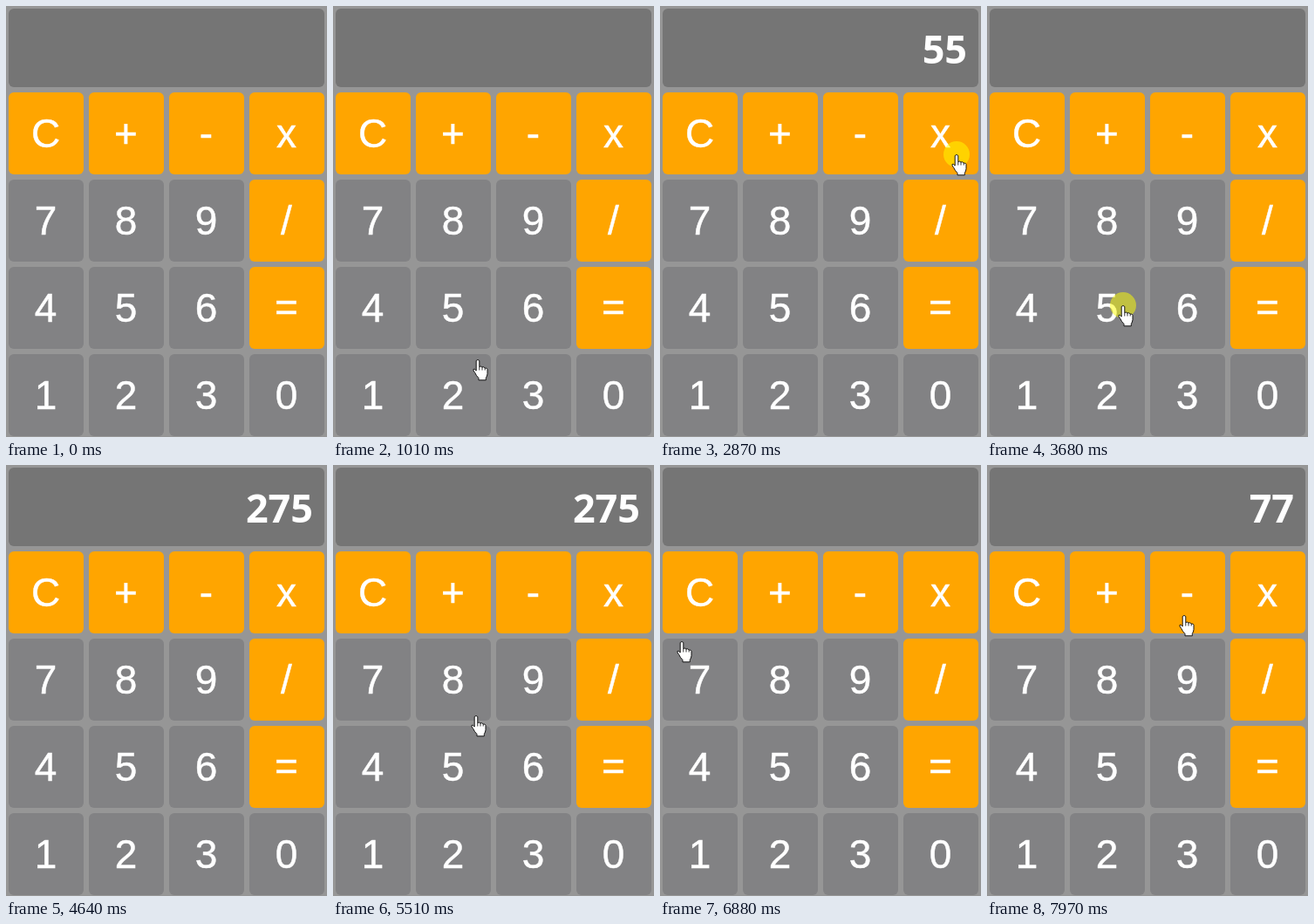
These frames come from a looping animation (368x494 px, 8000 ms). An HTML page:

```html
<!DOCTYPE html>
<html lang="en">
<head>
<meta charset="utf-8">
<title>Calculator</title>
<style>
  html, body { margin: 0; width: 100%; height: 100%; overflow: hidden; background: #969696; }
  svg { display: block; width: 368px; height: 494px; }
  text { fill: #fff; }
  .key { font: 46px "Liberation Sans", Arial, sans-serif; text-anchor: middle; stroke: #fff; stroke-width: .5px; }
  #readout { font: 700 45px "Open Sans", "Noto Sans", sans-serif; text-anchor: end; }
</style>
</head>
<body>
<svg viewBox="0 0 368 494">
  <rect width="368" height="494" fill="#969696"/>
  <rect x="3" y="3" width="362" height="90" rx="6" fill="#757575"/>
  <text id="readout" x="352" y="66"></text>
  <g id="keys"></g>
  <g id="pointer">
    <circle id="halo" r="15" fill="#ff0" opacity=".5"/>
    <path d="M-1.8 1.5Q0-.6 1.8 1.5V8.5Q4 7.4 5 9Q7 8 8.2 10Q10.2 9.3 11 11.5V16.5Q10.8 19 9.3 21.5V23.8H1V21.5Q-1.8 18.7-3.2 15.5Q-5.8 12.5-5 11.4Q-3.8 10.4-1.8 13Z"
      fill="#fff" stroke="#000" stroke-width=".9" stroke-linejoin="round"/>
    <path d="M1.8 8.5V12.5M5 9V12.5M8.2 10V12.5" fill="none" stroke="#000" stroke-width=".8"/>
  </g>
</svg>
<script>
const LOOP = 8000, STEP = 70, HOLD = 130, REPEAT = 350;
const LABELS = 'C+-x789/456=1230';
const byId = id => document.getElementById(id);
const readout = byId('readout'), pointer = byId('pointer'), halo = byId('halo');

function add(tag, attrs, text = '') {
  const el = document.createElementNS('http://www.w3.org/2000/svg', tag);
  for (const name in attrs) el.setAttribute(name, attrs[name]);
  el.textContent = text;
  byId('keys').append(el);
}

[...LABELS].forEach((label, i) => {
  const x = 3 + i % 4 * 92, y = 99 + Math.floor(i / 4) * 100;
  const fill = /\d/.test(label) ? '#828284' : '#ffa500';
  add('rect', { x, y, width: 86, height: 94, rx: 6, fill });
  add('text', { x: x + 42.5, y: y + (label === '=' ? 61.5 : 62.5), class: 'key' }, label);
});

const keyAt = (x, y) => LABELS[Math.floor((y - 96) / 100) * 4 + Math.floor(x / 92)];

// A stop of the pointer; taps repeat at a fixed pace and it leaves after the last release
function stop(at, x, y, tapAt = at, count = 0) {
  const taps = Array.from({ length: count }, (_, i) => ({ at: tapAt + i * REPEAT, key: keyAt(x, y) }));
  const leave = count ? taps[count - 1].at + HOLD : at;
  return { at, x, y, taps, leave };
}

const trips = [
  { end: 4640, stops: [
    stop(660, 183, 458),
    stop(1420, 144, 335, 1690, 2),
    stop(2800, 340, 170, 2870, 1),
    stop(3550, 156, 343, 3620, 1),
    stop(4020, 300, 347, 4290, 1),
    stop(4570, 303, 366)
  ] },
  { end: LOOP, stops: [
    stop(5300, 201, 325),
    stop(6000, 28, 147, 6200),
    stop(6400, 33, 140, 6570, 1),
    stop(6880, 25, 202),
    stop(7020, 26, 250, 7090, 2),
    stop(7970, 226, 172)
  ] }
];
const taps = trips.flatMap(trip => trip.stops.flatMap(s => s.taps));

const operate = {
  '+': (a, b) => a + b, '-': (a, b) => a - b,
  'x': (a, b) => a * b, '/': (a, b) => a / b
};

function valueAt(t) {
  let shown = '', left = '', op = '';
  for (const { at, key } of taps) {
    if (at + HOLD > t) break;
    if (/\d/.test(key)) shown += key;
    else if (key === '=') shown = String(operate[op](+left, +shown));
    else {
      left = shown;
      op = key;
      shown = '';
    }
  }
  return shown;
}

const ease = u => u * u * (3 - 2 * u);

function positionAt(stops, t) {
  const next = stops.findIndex(s => s.at > t);
  if (next < 1) return stops[stops.length - 1];
  const from = stops[next - 1], to = stops[next];
  // the drift before a tap starts only shortly before it ends
  const start = Math.max(from.leave, to.at - 760);
  const steps = Math.max(1, Math.round((to.at - start) / STEP));
  const u = Math.max(0, (t - start) / (to.at - start));
  const p = ease(Math.floor(u * steps + 1e-6) / steps);
  const mix = axis => Math.round(from[axis] + (to[axis] - from[axis]) * p);
  return { x: mix('x'), y: mix('y') };
}

function draw(t) {
  readout.textContent = valueAt(t);
  const pressed = taps.some(tap => t >= tap.at && t < tap.at + HOLD);
  halo.setAttribute('visibility', pressed ? 'inherit' : 'hidden');
  const trip = trips.find(({ stops, end }) => t >= stops[0].at && t < end);
  pointer.setAttribute('visibility', trip ? 'visible' : 'hidden');
  if (!trip) return;
  const { x, y } = positionAt(trip.stops, t);
  pointer.setAttribute('transform', `translate(${x} ${y})`);
}

// The pointer rests on C until the drift begins
trips[1].stops[1].leave = 6260;

const begin = performance.now();
function tick() {
  draw((performance.now() - begin) % LOOP);
  requestAnimationFrame(tick);
}
tick();
</script>
</body>
</html>
```
